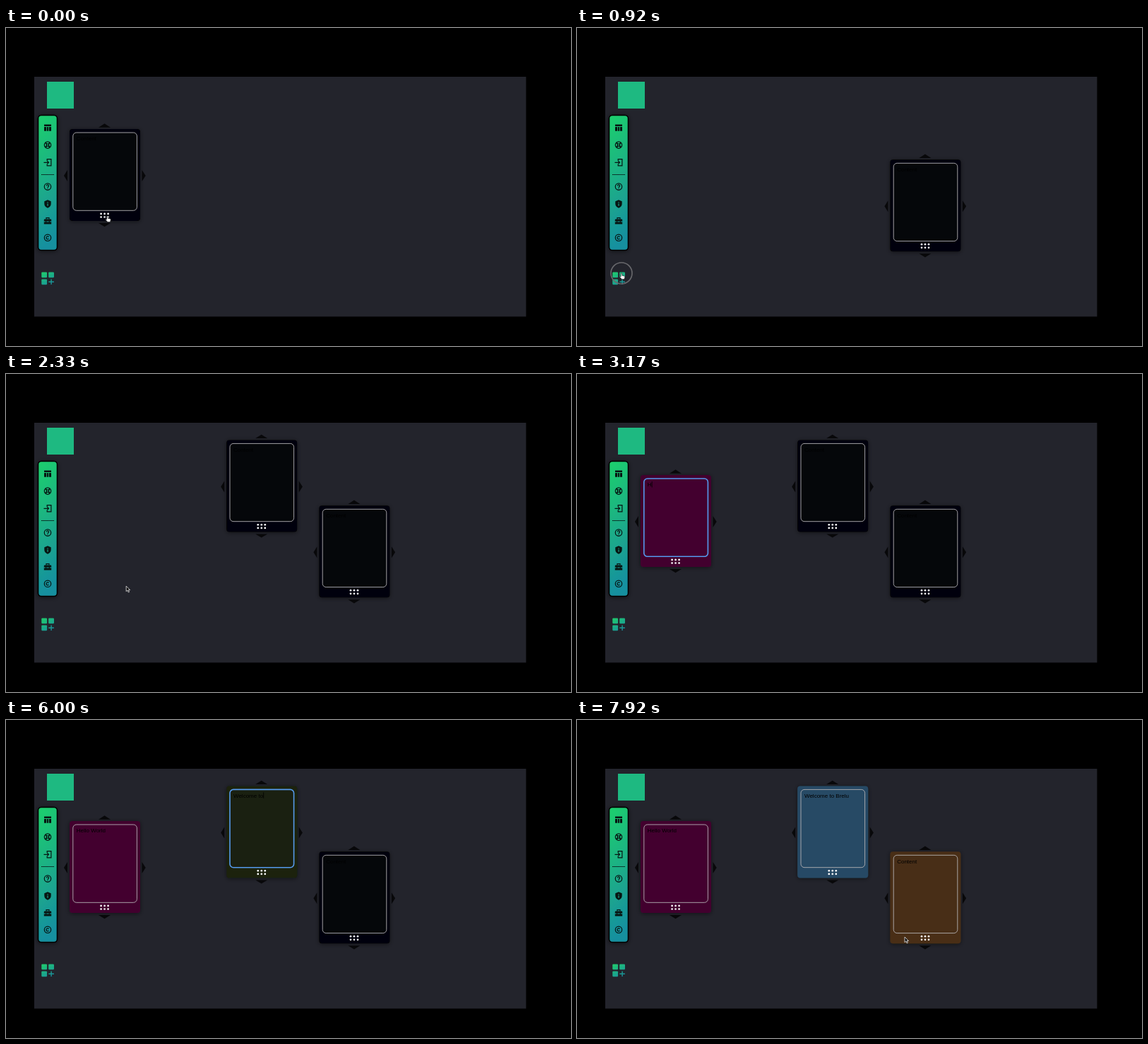
An HTML page that plays this animation: 800x450 px, repeating every 8 s.

```html
<!DOCTYPE html>
<html lang="en">
<head>
<meta charset="utf-8">
<title>Card board</title>
<style>
  html, body { margin: 0; width: 100%; height: 100%; overflow: hidden; background: #000; }
  svg { display: block; width: 100vw; height: 100vh; }
  text { font: 8px "Liberation Sans", Arial, sans-serif; white-space: pre; }
  .line { fill: none; stroke: #071512; stroke-width: 1.2; }
  .solid { fill: #071512; }
</style>
</head>
<body>
<svg viewBox="0 0 800 450">
  <defs>
    <linearGradient id="bar" x2="0.15" y2="1">
      <stop stop-color="#1fd06c"/><stop offset="1" stop-color="#18909f"/>
    </linearGradient>
    <linearGradient id="tiles" gradientUnits="userSpaceOnUse" x1="52" y1="345" x2="64" y2="363">
      <stop stop-color="#20cc6d"/><stop offset="1" stop-color="#18919e"/>
    </linearGradient>
    <filter id="shadow" x="-30%" y="-30%" width="160%" height="160%">
      <feDropShadow dx="0" dy="1" stdDeviation="3" flood-color="#000" flood-opacity=".5"/>
    </filter>
  </defs>

  <rect width="800" height="450"/>
  <rect x="40" y="69" width="696.4" height="339.4" fill="#23242c"/>

  <rect x="58" y="76" width="38" height="38" fill="#1eb981"/>

  <rect x="45.5" y="123.5" width="27" height="191" rx="4.5" fill="url(#bar)" stroke="#000" stroke-width="1.6" filter="url(#shadow)"/>
  <path d="M50 207.5H68" class="line" stroke-dasharray="1.6 .5"/>
  <path transform="translate(59 141)" class="solid" d="M-5-4.6H5V-1.9H-5ZM-5-1H-2V4.8H-5ZM-1.2-1H1.2V4.8H-1.2ZM2-1H5V4.8H2Z"/>
  <g transform="translate(59 165.6)" class="line">
    <circle r="4.7"/><circle r="1.6"/>
    <path d="M-3.2-3.2L-1.2-1.2M3.2-3.2L1.2-1.2M-3.2 3.2L-1.2 1.2M3.2 3.2L1.2 1.2" stroke-width="2"/>
  </g>
  <path transform="translate(59 190.3)" class="line" d="M-.8-2.6V-4.6H4.9V4.6H-.8V2.6M-5.5 0H1.4M-.9-2.4L1.5 0L-.9 2.4"/>
  <g transform="translate(59 224.6)" class="line">
    <circle r="4.7"/>
    <path d="M-1.6-1.2C-1.5-3.2 1.6-3.1 1.6-1.2C1.6 0 0 0 0 1.4M0 2.1V3.2"/>
  </g>
  <g transform="translate(59 249)">
    <path d="M0-5.7L4.7-3.8V0C4.7 2.8 2.6 4.8 0 5.8C-2.6 4.8-4.7 2.8-4.7 0V-3.8Z" class="solid"/>
    <path d="M0-2.8V-1.6M0-.6V2.8" stroke="#1da58d" stroke-width="1.2"/>
  </g>
  <g transform="translate(59 273)">
    <path d="M-5.2-1.6Q-5.2-2.6-4.2-2.6H4.2Q5.2-2.6 5.2-1.6V.6H-5.2ZM-5.2 1.4H5.2V4.4H-5.2Z" class="solid"/>
    <path d="M-2-2.6V-4.3H2V-2.6M-2.4 0V2M2.4 0V2" class="line"/>
  </g>
  <g transform="translate(59 296.8)" class="line">
    <circle r="4.7"/>
    <path d="M1.6-1.2A2 2 0 1 0 1.6 1.2"/>
  </g>

  <g fill="url(#tiles)">
    <rect x="50.3" y="345.4" width="7.8" height="7.8" rx="1.2"/>
    <rect x="60.2" y="345.4" width="7.8" height="7.8" rx="1.2"/>
    <rect x="50.3" y="355.4" width="7.8" height="7.8" rx="1.2"/>
    <path d="M63.4 355.6H64.8V358.6H67.9V360H64.8V363H63.4V360H60.3V358.6H63.4Z"/>
  </g>

  <g id="cards"></g>
  <circle id="ring" r="15" fill="none" stroke="#69696d" stroke-width="1.6"/>
  <path id="hand" d="M-.9.5Q0-.6.8.5V3.2L4 4Q5.1 4.5 4.8 5.6L4 8.6H.4L-2.4 5.4Q-2.4 4.2-.9 5Z" fill="#fff" stroke="#111" stroke-width=".6"/>
  <path id="arrow" d="M0 0V7.6L1.8 6L3.1 8.9L4.4 8.3L3.1 5.5H5.5Z" fill="#111" stroke="#e8e8e8" stroke-width=".8"/>
</svg>
<script>
const LOOP = 8000, FRAMES = 96, STEP = LOOP / FRAMES;
const KEY = 93, PRESS = 110;
const HOME = [90, 143], ADD = [63, 347], DOTS = [49.6, 122.2];
const DARK = "#060607";
const $ = id => document.getElementById(id);
const ease = p => p * p * (3 - 2 * p);
const within = (t, span) => !!span && t >= span[0] && t < span[1];
const dist = (a, b) => Math.hypot(a[0] - b[0], a[1] - b[1]);
const add = (a, b, k = 1) => [a[0] + b[0] * k, a[1] + b[1] * k];

// Where the pointer goes and when it gets there; it presses at each stop
const stops = [
  { at: -PRESS, pos: [143.5, 266] },
  { at: 450, pos: [496.9, 309.3] },
  { at: 900, pos: ADD },
  { at: 1250, pos: [150.5, 261] },
  { at: 1708, pos: [372.7, 211.4] },
  { at: 2480, pos: ADD },
  { at: 2780, pos: [108, 266] },
  { at: 3000, pos: [118, 157] },
  { at: 4763, pos: [342, 211] },
  { at: 4960, pos: [345, 108] },
  { at: 6960, pos: [328, 214] },
  { at: 7450, pos: [464, 307] }
];

const cards = [
  { born: 0, drag: [60, 450], colors: [[7580, "#482e17"]] },
  { born: 980, drag: [1250, 1708], focus: [4980, 6740], text: "Welcome to Brelu",
    colors: [[4800, "#1a2011"], [7030, "#274a65"]] },
  { born: 2560, focus: [3010, 4240], text: "Hello World", colors: [[2840, "#43002f"]] }
];

const lastStop = t => stops.findLastIndex(s => s.at <= t);

// Rest at a stop, then travel so as to arrive at the next one on time
function pointer(t) {
  const i = lastStop(t), from = stops[i], to = stops[i + 1];
  if (!to) return from.pos;
  const travel = Math.min(to.at - from.at, 100 + 0.8 * dist(from.pos, to.pos));
  const p = ease(Math.max(0, 1 - (to.at - t) / travel));
  return add(from.pos, add(to.pos, from.pos, -1), p);
}

function cardPos({ drag }, t) {
  if (!drag || t < drag[0]) return HOME;
  const moved = add(pointer(Math.min(t, drag[1])), pointer(drag[0]), -1);
  return add(HOME, moved);
}

function cardText({ text, focus }, t) {
  if (!focus || t < focus[0]) return "Content";
  return text.slice(0, Math.max(0, Math.floor((t - focus[0] - 150) / KEY) + 1));
}

function build(card) {
  const dots = Array.from({ length: 6 }, (_, i) =>
    `<circle cx="${DOTS[0] + (i % 3 - 1) * 5}" cy="${DOTS[1] + (i < 3 ? -2.3 : 2.3)}" r="1.35" fill="#fff"/>`).join("");
  $("cards").insertAdjacentHTML("beforeend", `<g>
    <path d="M41-2.3L49.5-7.7L58-2.3ZM41 133L49.5 138.2L58 133ZM-3 58L-8 66L-3 74ZM102.5 58L107.7 66L102.5 74Z" fill="#08080a"/>
    <rect class="body" width="100" height="130" rx="4" filter="url(#shadow)"/>
    <rect class="inner" x="4.8" y="5" width="90.6" height="110.3" rx="5"/>
    ${dots}<text x="9.8" y="16.3"></text><path class="caret" stroke="#000" stroke-width=".8"/></g>`);
  const g = $("cards").lastElementChild;
  const [body, inner, label, caret] = [".body", ".inner", "text", ".caret"].map(s => g.querySelector(s));
  card.el = { g, body, inner, label, caret };
}

function set(el, attrs) {
  for (const name in attrs) el.setAttribute(name, attrs[name]);
}
const show = (el, on) => set(el, { display: on ? "inline" : "none" });
const move = (el, [x, y], scale = 1) =>
  set(el, { transform: `translate(${x} ${y}) scale(${scale})` });

function drawCard(card, t) {
  const { g, body, inner, label, caret } = card.el;
  const focused = within(t, card.focus);
  const grow = within(t, card.drag) ? 0.01 : 0;
  const color = card.colors.reduce((c, [at, next]) => t >= at ? next : c, DARK);
  show(g, t >= card.born);
  move(g, add(cardPos(card, t), [50, 65], -grow), 1 + grow);
  set(body, { fill: color });
  set(inner, {
    fill: color === DARK ? "#05070a" : color,
    stroke: focused ? "#5599ec" : "#b5b3b5",
    "stroke-width": focused ? 1.6 : 0.9
  });
  label.textContent = cardText(card, t);
  show(caret, focused);
  if (focused) set(caret, { d: `M${10.4 + label.getComputedTextLength()} 9v8.5` });
}

function draw(t) {
  cards.forEach(card => drawCard(card, t));
  const tip = pointer(t);
  const typing = cards.some(c => within(t - PRESS, c.focus) && within(t, c.focus));
  const dragging = cards.some(c => within(t, c.drag));
  const grip = cards.some(c => t >= c.born && dist(tip, add(cardPos(c, t), DOTS)) < 15);
  const hand = dragging || grip || dist(tip, ADD) < 12;
  for (const id of ["ring", "hand", "arrow"]) move($(id), tip);
  show($("ring"), dragging || t - stops[lastStop(t)].at < PRESS);
  show($("hand"), hand && !typing);
  show($("arrow"), !hand && !typing);
}

cards.forEach(build);
const start = performance.now();
function tick(now) {
  const t = Math.max(0, now - start) % LOOP;
  draw(Math.min(FRAMES - 1, Math.floor((t + 4) / STEP)) * STEP);
  requestAnimationFrame(tick);
}
draw(0);
requestAnimationFrame(tick);
</script>
</body>
</html>
```
